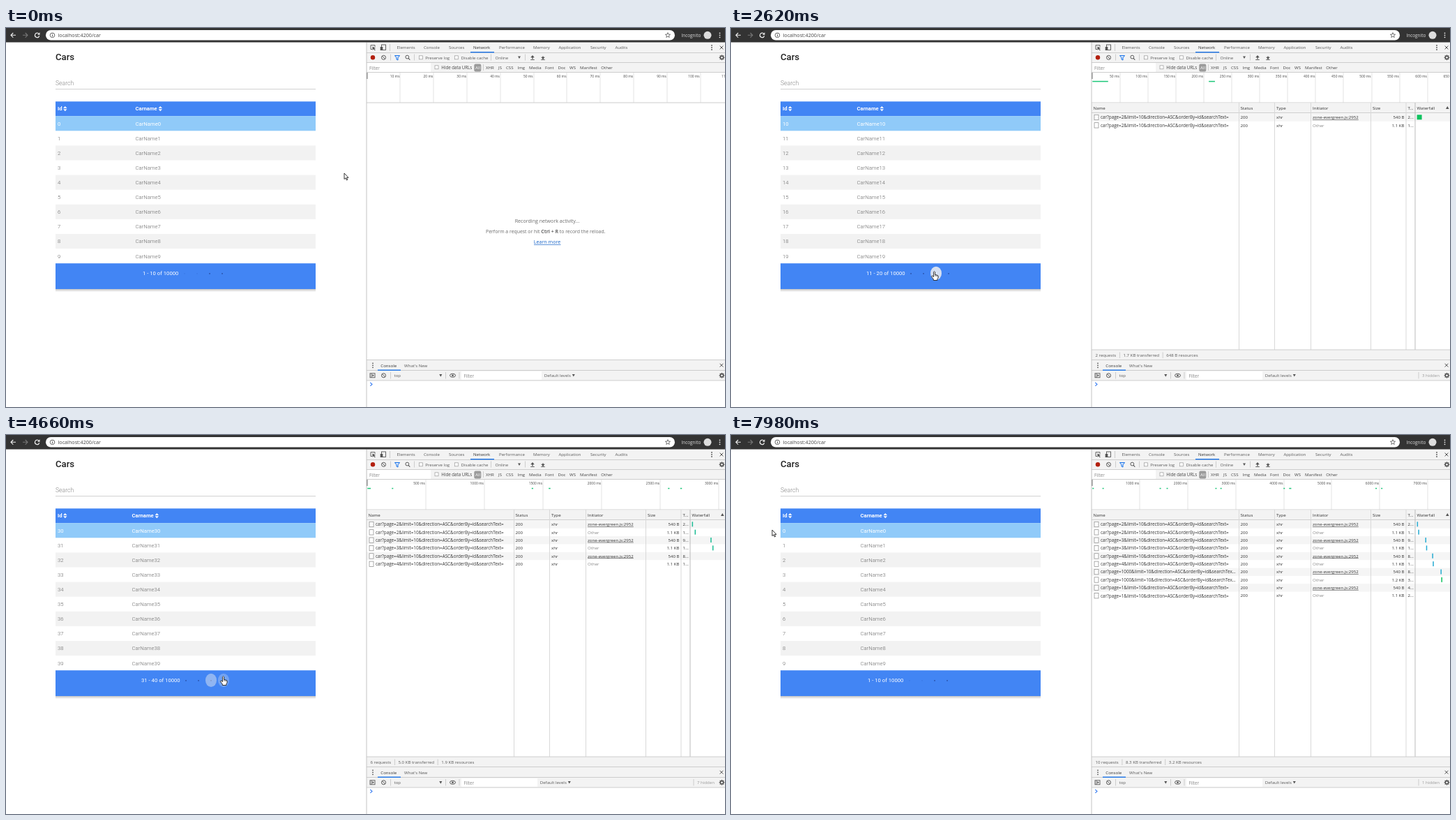
These frames come from a looping animation (1031 px wide and 543 px high, 8 s). An HTML page with a canvas:

```html
<!DOCTYPE html>
<html lang="en">
<head>
<meta charset="utf-8">
<title>Cars</title>
<style>
html, body { margin: 0; width: 100%; height: 100%; overflow: hidden; background: #fff; }
canvas { display: block; width: 1031px; height: 543px; }
</style>
</head>
<body>
<canvas id="stage"></canvas>
<script>
const W = 1031, H = 543, LOOP = 8000;
const canvas = document.getElementById('stage');
const ctx = canvas.getContext('2d');
const dpr = window.devicePixelRatio || 1;
canvas.width = W * dpr;
canvas.height = H * dpr;

const UI = '"Open Sans", "Noto Sans", sans-serif';
const APP = 'Roboto, sans-serif';
const BLUE = '#4285f4', BAR = '#f3f3f3', EDGE = '#cdcdcd', INK = '#5a5a5a', GREEN = '#0fc25f';

// Each page: when it is asked for, answered and shown; its first row and layout.
const pages = [
  { click: -1, reply: -1, fill: -1, first: 0, nameX: 185.5, unit: 10, step: 47.8, zoom: 0.25 },
  { click: 1480, reply: 1910, fill: 2000, first: 10, nameX: 180.5, unit: 50, step: 40.1, zoom: 0.25, query: 2 },
  { click: 2700, reply: 3180, fill: 3310, first: 20, nameX: 180.5, unit: 200, step: 52.6, zoom: 0.0325, query: 3 },
  { click: 3850, reply: 4130, fill: 4200, first: 30, nameX: 180.5, unit: 500, step: 84.1, zoom: 0.019, query: 4 },
  { click: 5230, reply: 5710, fill: 5800, first: 9990, nameX: 182, unit: 500, step: 53.75, zoom: 0.0123, query: 1000 },
  { click: 7150, reply: 7400, fill: 7500, first: 0, nameX: 185.5, unit: 1000, step: 68.75, zoom: 0.0085, query: 1 }
];
// Network log: start and duration in ms.
const requests = [[0, 28], [208, 11], [1400, 13], [1545, 15], [2562, 13],
  [2667, 14], [3985, 16], [4102, 45], [5902, 16], [6020, 22]];
const took = '2191818342';
const sent = ['', '540 B', '1.7 KB', '2.2 KB', '3.3 KB', '3.9 KB', '5.0 KB', '5.5 KB', '6.7 KB', '7.2 KB', '8.3 KB'];
const held = ['0 B', '648 B', '1.3 KB', '1.9 KB', '2.6 KB', '3.2 KB'];
const hidden = [[1480, 1], [1910, 2], [2050, 3], [3180, 4], [3360, 5], [4130, 6], [4300, 7], [5710, 8], [5910, 9], [7400, 1]];

// Pointer tip: time, x, y
const path = [[0, 485, 208], [270, 485, 208], [480, 380, 262], [700, 203, 342], [1070, 291.5, 348.5],
  [4300, 291.5, 348.5], [4560, 311.5, 345.5], [5710, 311.5, 345.5], [5850, 303, 346], [6220, 303, 346],
  [6500, 288, 349], [6800, 270, 352], [7200, 270, 352], [7450, 180, 260], [7700, 40, 146],
  [7850, 34, 142], [7880, 38, 140], [7980, 59, 136]];
const handSpans = [[1050, 1640], [2000, 5700], [6420, 7200]];

const ramp = (t, a, b) => Math.min(1, Math.max(0, (t - a) / (b - a)));
const pulse = (t, a, b, c, d) => Math.min(ramp(t, a, b), 1 - ramp(t, c, d));

function rect(x, y, w, h, color) {
  ctx.fillStyle = color;
  ctx.fillRect(x, y, w, h);
}
const hline = (y, x = 517) => rect(x, y, W - x, 1, EDGE);
const vline = (x, y, h, color = EDGE) => rect(x, y, 1, h, color);

// y is the middle of the capitals; returns the right edge.
function text(s, x, y, size = 6.1, color = INK, opt = {}) {
  ctx.font = `${opt.weight || 400} ${size}px ${opt.font || UI}`;
  ctx.fillStyle = color;
  ctx.textAlign = opt.align || 'left';
  ctx.fillText(s, x, y + size * 0.36);
  return x + ctx.measureText(s).width;
}

function stroke(color, width, ...lines) {
  ctx.strokeStyle = color;
  ctx.lineWidth = width;
  ctx.beginPath();
  for (const l of lines)
    for (let i = 0; i < l.length; i += 2) ctx[i ? 'lineTo' : 'moveTo'](l[i], l[i + 1]);
  ctx.stroke();
}
function poly(color, ...p) {
  ctx.fillStyle = color;
  ctx.beginPath();
  for (let i = 0; i < p.length; i += 2) ctx.lineTo(p[i], p[i + 1]);
  ctx.fill();
}
function dot(x, y, r, color, ry = r) {
  ctx.fillStyle = color;
  ctx.beginPath();
  ctx.ellipse(x, y, r, ry, 0, 0, 7);
  ctx.fill();
}
function ring(x, y, r, color, width = 0.9, from = 0, to = 7) {
  ctx.strokeStyle = color;
  ctx.lineWidth = width;
  ctx.beginPath();
  ctx.arc(x, y, r, from, to);
  ctx.stroke();
}
function box(x, y, w, h, color, width = 0.7) {
  ctx.strokeStyle = color;
  ctx.lineWidth = width;
  ctx.strokeRect(x, y, w, h);
}
function pill(x, y, w, h, r, color) {
  ctx.fillStyle = color;
  ctx.beginPath();
  ctx.roundRect(x, y, w, h, r);
  ctx.fill();
}
const down = (x, y) => poly('#555', x - 2, y - 1.7, x + 2, y - 1.7, x, y + 1.9);
const kebab = (x, y, color) => [-3, 0, 3].forEach(d => dot(x, y + d, 0.9, color));
const cross = (x, y) => stroke('#555', 1, [x - 2.4, y - 2.4, x + 2.4, y + 2.4], [x + 2.4, y - 2.4, x - 2.4, y + 2.4]);
function clearIcon(x, y) {
  ring(x, y, 3, '#555', 1);
  stroke('#555', 1, [x - 2, y - 2, x + 2, y + 2]);
}
function gear(x, y) {
  ring(x, y, 2.2, '#555', 1.6);
  for (let a = 0; a < 8; a++) {
    const c = Math.cos(a * Math.PI / 4), s = Math.sin(a * Math.PI / 4);
    stroke('#555', 1.2, [x + c * 2.5, y + s * 2.5, x + c * 3.9, y + s * 3.9]);
  }
}
function check(x, y) {
  rect(x, y, 5, 5, '#fff');
  box(x, y, 5, 5, '#999');
}

function browserBar() {
  rect(0, 0, W, 20.5, '#333');
  pill(57, 3, 902, 14.5, 7.25, '#fff');
  stroke('#eee', 1.1, [14, 10.3, 7, 10.3], [10.3, 7, 7, 10.3, 10.3, 13.6]);
  stroke('#777', 1.1, [24, 10.3, 31, 10.3], [27.7, 7, 31, 10.3, 27.7, 13.6]);
  ring(44.7, 10.3, 3.2, '#eee', 1.2, 0.3, 5.5);
  poly('#eee', 48.5, 6.3, 48.5, 9.8, 45, 9.8);
  ring(66.5, 10.3, 3.3, '#555', 0.9);
  rect(66, 9.8, 1, 2.4, '#555');
  rect(66, 8.3, 1, 0.9, '#555');
  text('localhost:4200/car', 74.5, 10.5, 7.2, '#444');
  const star = [];
  for (let i = 0; i <= 10; i++) {
    const r = i % 2 ? 1.6 : 3.8, a = i * Math.PI / 5;
    star.push(949 + r * Math.sin(a), 10.4 - r * Math.cos(a));
  }
  stroke('#555', 0.8, star);
  text('Incognito', 968.5, 10.5, 6.4, '#ddd');
  dot(1006, 10.3, 5.5, '#ddd');
  kebab(1023.5, 10.3, '#eee');
}

function sortIcon(x, y) {
  poly('#fff', x - 2.7, y - 0.7, x + 2.7, y - 0.7, x, y - 3.6);
  poly('#fff', x - 2.7, y + 0.7, x + 2.7, y + 0.7, x, y + 3.6);
}

function app(t, page, filled) {
  text('Cars', 71, 41, 13.1, '#212121', { font: APP, weight: 500 });
  text('Search', 71, 78.7, 8.6, '#858585', { font: APP, weight: 300 });
  rect(71, 87.3, 373, 0.8, '#c4c4c4');

  const nameX = filled ? page.nameX : page.nameX === 180.5 ? 185 : page.nameX;
  const rowH = filled ? 21.1 : 9.75;
  rect(71, 105.3, 373, 20.9, BLUE);
  const head = { font: APP, weight: 700 };
  text('Id', 74, 115.7, 7.7, '#fff', head);
  sortIcon(84.8, 115.6);
  sortIcon(text('Carname', nameX, 115.7, 7.7, '#fff', head) + 4.6, 115.6);

  for (let i = 0; i < 10; i++) {
    const y = 126.2 + i * rowH, lit = filled && !i;
    if (i % 2 === 0) rect(71, y, 373, rowH, lit ? '#90caf9' : '#f2f2f2');
    if (!filled) continue;
    const color = lit ? '#fff' : '#666', opt = { font: APP, weight: lit ? 400 : 300 };
    text(page.first + i, 74, y + 10.7, 7.7, color, opt);
    text('CarName' + (page.first + i), nameX, y + 10.7, 7.7, color, opt);
  }

  const top = 126.2 + 10 * rowH, mid = top + 14;
  const shade = ctx.createLinearGradient(0, top + 36, 0, top + 41);
  shade.addColorStop(0, 'rgba(0,0,0,.28)');
  shade.addColorStop(1, 'rgba(0,0,0,0)');
  rect(71, top + 36, 373, 5, shade);
  rect(71, top, 373, 36.8, BLUE);

  const last = page.first === 9990, start = page.first === 0;
  const range = `${page.first + 1} - ${page.first + 10} of 10000`;
  text(range, start ? 196 : last ? 183 : 194, mid - 0.3, 7.7, '#fff', { font: APP });
  const x0 = start ? 256 : last ? 269 : 258;
  for (let i = 0; i < 4; i++) {
    const off = i < 2 ? start : last;
    rect(x0 + i * 18 - 0.8, mid - 0.2, 1.7, 1.7, off ? 'rgba(20,40,110,.08)' : 'rgba(20,40,110,.5)');
  }
  const glow = (i, a) => a > 0 && dot(x0 + i * 18, mid + 0.2, 8, `rgba(240,240,240,${a})`, 9.6);
  glow(2, 0.85 * pulse(t, 1110, 1210, 4450, 4900));
  glow(3, 0.85 * pulse(t, 4560, 4870, 5230, 5350));
  glow(0, 0.85 * pulse(t, 6700, 6880, 7150, 7300));
}

function toolbars() {
  rect(517, 20.5, 514, 43, BAR);
  rect(518, 50, 91, 13, '#fff');
  [35, 49, 63].forEach(y => hline(y));

  stroke('#555', 0.9, [529, 27, 529, 24.7, 523, 24.7, 523, 30.5, 525, 30.5]);
  poly('#555', 525.5, 26.5, 530.3, 29, 528, 29.6, 529.8, 31.7, 528.8, 32.3, 527.1, 30.2, 525.5, 31.8);
  box(538.5, 24, 6, 7.5, '#555', 0.9);
  rect(536.7, 27, 3.6, 5, '#555');
  vline(550, 23, 10);
  const tabs = { Elements: 560.5, Console: 599, Sources: 635, Network: 670, Performance: 707,
    Memory: 756, Application: 792.5, Security: 838, Audits: 873.5 };
  for (const name in tabs) text(name, tabs[name], 28.2, 6.1, name === 'Network' ? '#333' : INK);
  rect(666, 34, 34, 1.4, '#1a73e8');
  kebab(1012, 28, '#555');
  cross(1026, 28);

  dot(526, 42.2, 3.2, '#b3200f');
  clearIcon(541.5, 42.3);
  vline(551, 37.5, 9);
  ctx.save();
  poly('#d6e6fb', 557.5, 39.5, 564.5, 39.5, 562, 42.8, 562, 46, 560, 46, 560, 42.8);
  stroke('#1a73e8', 1, [557.5, 39.5, 564.5, 39.5, 562, 42.8, 562, 46, 560, 45, 560, 42.8, 557.5, 39.5]);
  ctx.restore();
  ring(575.3, 41.6, 2.4, '#555', 1);
  stroke('#555', 1.1, [577, 43.4, 579.3, 45.7]);
  vline(585, 37.5, 9);
  check(592.5, 39.8);
  text('Preserve log', 601.3, 42.5);
  check(643.3, 39.8);
  text('Disable cache', 652.5, 42.5);
  vline(695, 37.5, 9);
  text('Online', 701.5, 42.5);
  down(736, 42.2);
  vline(744, 37.5, 9);
  for (const [x, s] of [[755, 1], [770, -1]]) {
    poly('#555', x - 2.8, 42 + s * 0.3, x + 2.8, 42 + s * 0.3, x, 42 - s * 3);
    rect(x - 0.7, 40.5, 1.4, 4, '#555');
    rect(x - 2.8, 45, 5.6, 0.9, '#555');
  }
  gear(1026.5, 42.3);

  text('Filter', 521, 57.2, 6.4, '#888');
  check(615, 53.8);
  text('Hide data URLs', 624.3, 57, 6.2, '#444');
  pill(671.3, 51.5, 10, 11, 2, '#9b9b9b');
  text('All', 673, 57, 6.1, '#fff');
  vline(684, 52, 9);
  const kinds = { XHR: 688, JS: 706, CSS: 717, Img: 733.5, Media: 750, Font: 773, Doc: 791.5,
    WS: 808, Manifest: 823, Other: 853.3 };
  for (const name in kinds) text(name, kinds[name], 57, 6.1, '#444');
}

function overview(page, count) {
  for (let i = 1; i < 14; i++) {
    const x = 517.5 + i * page.step;
    vline(Math.round(x) - 0.5, 64, 43, '#e3e3e3');
    text(i * page.unit + ' ms', x - 0.8, 69, 4.9, '#444', { align: 'right' });
  }
  hline(106.5);
  rect(517, 64, 1.5, 9, '#777');
  for (const [start, time] of requests.slice(0, count)) {
    const k = page.step / page.unit;
    rect(518.3 + start * k, 75.8, Math.max(2, time * k), 1.5, '#1cc678');
  }
}

function emptyLog() {
  const opt = { align: 'center' };
  text('Recording network activity...', 776, 276.3, 7.1, '#6b6b6b', opt);
  const parts = [['Perform a request or hit ', 400], ['Ctrl + R', 700], [' to record the reload.', 400]];
  let x = 688;
  for (const [s, weight] of parts) x = text(s, x, 291.5, 6.9, '#6b6b6b', { weight });
  text('Learn more', 776, 306.7, 7.1, '#1a66c9', opt);
  rect(757, 310, 38.5, 0.7, '#1a66c9');
}

function log(page, count) {
  rect(517, 107.5, 514, 13.5, BAR);
  for (let i = 0; i < count; i++) {
    const mid = 128 + i * 11.36, [start, time] = requests[i], odd = i % 2;
    const query = pages[(i >> 1) + 1].query;
    if (!odd) rect(517, mid - 5.7, 514, 11.36, '#f5f5f5');
    rect(521, mid - 3.7, 6, 7.4, '#fff');
    box(521, mid - 3.7, 6, 7.4, '#888');
    const tail = query === 1000 ? 'searchTex...' : 'searchText=';
    text(`car?page=${query}&limit=10&direction=ASC&orderBy=id&${tail}`, 530, mid, 6.3, '#333');
    text('200', 730.5, mid, 6.1, '#333');
    text('xhr', 782, mid, 6.1, '#333');
    const end = text(odd ? 'Other' : 'zone-evergreen.js:2952', 834, mid, 6.1, odd ? '#888' : '#333');
    if (!odd) rect(834, mid + 3, end - 834, 0.6, '#444');
    text(odd ? query === 1000 ? '1.2 KB' : '1.1 KB' : '540 B', 965.5, mid, 6.1, '#333', { align: 'right' });
    text(took[i] + '...', 970.5, mid, 6.1, '#333');
    const color = page.zoom > 0.1 || time > 40 ? GREEN : page.zoom > 0.015 ? '#1abc94' : '#25abd2';
    rect(983.6 + start * page.zoom, mid - 3.7, Math.max(1.5, time * page.zoom), 7, color);
  }
  hline(121);
  [728, 779, 831, 917, 967.5].forEach(x => vline(x, 107, 354, '#d9d9d9'));
  vline(980.5, 107, 354, '#bbb');
  const heads = { Name: 519.5, Status: 730.5, Type: 782, Initiator: 834, Size: 920, 'T...': 970.5, Waterfall: 983.5 };
  for (const name in heads) text(name, heads[name], 114.5, 6.15, '#333');
  poly('#555', 1025, 116, 1029.6, 116, 1027.3, 112);

  rect(517, 461, 514, 14, BAR);
  hline(460.5);
  let x = text(count + ' requests', 522.5, 469);
  for (const s of [sent[count] + ' transferred', held[(count + 1 >> 1)] + ' resources']) {
    vline(x + 4.7, 464.5, 8.5);
    x = text(s, x + 10.3, 469);
  }
}

function drawer(t) {
  rect(517, 475.5, 514, 29.5, BAR);
  [475, 490, 504.5].forEach(y => hline(y));
  kebab(526, 483.3, '#555');
  text('Console', 537.3, 483.5, 6.1, '#333');
  text("What's New", 571, 483.5);
  rect(533, 489.5, 33, 1.4, '#1a73e8');
  cross(1026, 483.2);

  box(522, 494.8, 7, 6, '#555', 0.9);
  rect(523.6, 495, 0.8, 6, '#555');
  poly('#555', 525.3, 496, 528, 497.8, 525.3, 499.6);
  clearIcon(541.5, 497.8);
  vline(551, 493, 9.5);
  text('top', 556.5, 498);
  down(623.3, 497.8);
  vline(630, 493, 9.5);
  ctx.strokeStyle = '#555';
  ctx.lineWidth = 1;
  ctx.beginPath();
  ctx.ellipse(640.5, 497.8, 4, 2.5, 0, 0, 7);
  ctx.stroke();
  dot(640.5, 497.8, 1.4, '#555');
  vline(649.5, 493, 9.5);

  const seen = hidden.filter(h => h[0] <= t).pop();
  rect(653, 492, seen ? 109 : 115, 12, '#fff');
  text('Filter', 656.5, 498.3, 6.2, '#888');
  down(text('Default levels', seen ? 765.7 : 771.7, 498) + 4, 497.6);
  if (seen) {
    vline(985.5, 493, 9.5);
    text(seen[1] + ' hidden', 991, 498, 6.1, '#999');
  }
  gear(1026.5, 497.8);
  stroke('#367cf1', 1.1, [522.3, 508, 525, 510.4, 522.3, 512.8]);
}

function pointer(t) {
  let i = 0;
  while (i < path.length - 2 && path[i + 1][0] <= t) i++;
  const [ta, xa, ya] = path[i], [tb, xb, yb] = path[i + 1];
  const k = ramp(t, ta, tb);
  const hand = handSpans.some(([a, b]) => t >= a && t < b);
  ctx.save();
  ctx.translate(xa + (xb - xa) * k, ya + (yb - ya) * k);
  const shape = new Path2D(hand
    ? 'M-1 1Q0-.8 1 1V5L2.6 5.2 4.2 5.7 5.6 6.6V9.5L4.4 11.2V13H-1.2V11.4L-3.8 8Q-4-.1+6.5-2.6 6.7L-1 8Z'.replace('Q-4-.1+6.5-2.6 6.7', 'Q-4 6.2-2.6 6.6')
    : 'M0 0V8.6L2 6.8 3.4 10 4.8 9.4 3.4 6.4H6Z');
  ctx.lineJoin = 'round';
  ctx.lineWidth = 0.9;
  ctx.strokeStyle = '#222';
  ctx.fillStyle = '#fff';
  ctx.fill(shape);
  ctx.stroke(shape);
  if (hand) stroke('#222', 0.5, [1.1, 5, 1.1, 7.4], [2.7, 5.4, 2.7, 7.6], [4.2, 5.9, 4.2, 7.8]);
  ctx.restore();
}

function draw(now) {
  const t = now % LOOP;
  const index = pages.filter(p => p.click <= t).length - 1;
  const page = pages[index];
  const count = index ? index * 2 - (t < page.reply) : 0;
  ctx.setTransform(dpr, 0, 0, dpr, 0, 0);
  rect(0, 0, W, H, '#fff');
  app(t, page, t >= page.fill);
  toolbars();
  overview(count === 1 ? pages[0] : page, count);
  if (count) log(page, count); else emptyLog();
  drawer(t);
  vline(516.5, 20.5, 523, '#c4c4c4');
  browserBar();
  pointer(t);
  requestAnimationFrame(draw);
}
requestAnimationFrame(draw);
</script>
</body>
</html>
```
